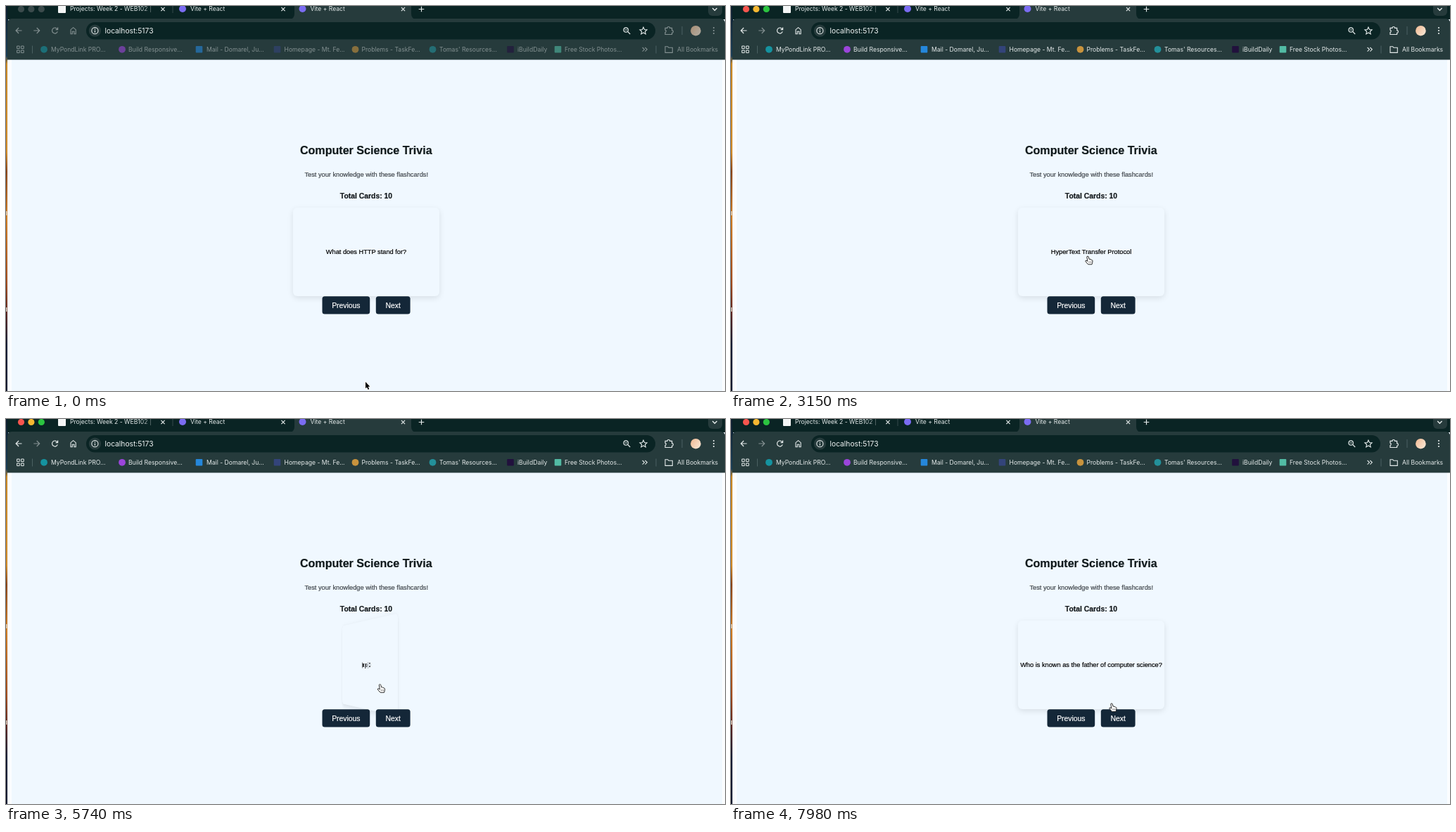
Write an HTML page with a canvas that moves like this. It is 1022 by 548 pixels and loops after 8000 ms.

```html
<!DOCTYPE html>
<html lang="en">
<head>
<meta charset="utf-8">
<title>Computer Science Trivia</title>
<style>
  html, body { margin: 0; width: 100%; height: 100%; overflow: hidden; background: #f0f8ff; }
  canvas { position: absolute; left: 0; top: 0; }
  #card {
    position: absolute; left: 408px; top: 287px; width: 208px; height: 126px;
    border-radius: 6px; background: #f0f8ff; box-shadow: 0 2.8px 9px rgba(0, 0, 0, .1);
    display: flex; align-items: center; justify-content: center;
    font: 9.24px "Liberation Sans", Arial, sans-serif; color: #000; white-space: nowrap;
    -webkit-text-stroke: .2px #000;
  }
</style>
</head>
<body>
<canvas id="back" width="1022" height="548"></canvas>
<div id="card"></div>
<canvas id="front" width="1022" height="548"></canvas>
<script>
const LOOP = 8000, STEP = 70, FLIP = 300, ACTIVE_AT = 1750, HAND_AT = 1960;
const UI = 'Inter, sans-serif';
const PAGE = '"Liberation Sans", Arial, sans-serif';
const BAR = '#263b3c', DARK = '#0a2424', LIGHT = '#e4eaea', DIM = '#839091';

const card = document.getElementById('card');
const back = document.getElementById('back').getContext('2d');
const front = document.getElementById('front').getContext('2d');

// Pointer tip: time, x, y
const pointer = [
  [0, 511, 535], [140, 506, 499], [350, 506, 499], [630, 500, 417],
  [840, 500, 417], [1190, 507, 356.5], [3150, 507, 355.8], [3290, 511, 363],
  [3500, 536, 404], [3710, 546.5, 418.5], [4410, 546.5, 418.5],
  [4620, 543, 413], [4970, 534.5, 392.5], [5250, 531, 377],
  [5740, 531.5, 377.3], [6370, 525, 382], [6580, 531, 396],
  [6930, 545, 421], [7280, 545, 421], [7630, 543, 412], [7980, 541, 404.5]
];

const clicks = [1750, 2240, 3780, 5320, 7000];

const cards = [
  { at: 0, text: 'What does HTTP stand for?' },
  { at: 2580, text: 'HyperText Transfer Protocol', from: 0, to: 360 },
  { at: 4050, text: 'What is the time complexity of binary search?', from: 360, to: 0 },
  { at: 5678, text: 'O(log n)', from: 0, to: 360 },
  { at: 7258, text: 'Who is known as the father of computer science?', from: 360, to: 0 }
];

// Bookmark: icon x, icon colour, text x, label, square icon
const bookmarks = [
  [54, '#1593a0', 64, 'MyPondLink PRO...', false],
  [165, '#9b45db', 174, 'Build Responsive...', false],
  [274.5, '#2587db', 285, 'Mail - Domarel, Ju...', true],
  [385.5, '#33447a', 395.5, 'Homepage - Mt. Fe...', true],
  [496.5, '#c8933d', 505.5, 'Problems - TaskFe...', false],
  [606.5, '#23909a', 616, "Tomas' Resources...", false],
  [717, '#21113d', 727, 'iBuildDaily', true],
  [784.5, '#52bba4', 794, 'Free Stock Photos...', true]
];

function rect(c, x, y, w, h, color, r = 0) {
  c.fillStyle = color;
  c.beginPath();
  c.roundRect(x, y, w, h, r);
  c.fill();
}

function disc(c, x, y, r, color) {
  c.fillStyle = color;
  c.beginPath();
  c.arc(x, y, r, 0, Math.PI * 2);
  c.fill();
}

function ring(c, x, y, r, color, width) {
  c.strokeStyle = color;
  c.lineWidth = width;
  c.beginPath();
  c.arc(x, y, r, 0, Math.PI * 2);
  c.stroke();
}

function stroke(c, d, color, width = 1.2) {
  c.strokeStyle = color;
  c.lineWidth = width;
  c.stroke(new Path2D(d));
}

function label(c, text, x, y, font, color, align = 'left') {
  c.font = font;
  c.fillStyle = color;
  c.textAlign = align;
  c.fillText(text, x, y);
}

// Page text carries slightly heavier strokes than the browser chrome
function pageLabel(c, text, x, y, font, color) {
  label(c, text, x, y, `${font} ${PAGE}`, color, 'center');
  c.strokeStyle = color;
  c.lineWidth = .2;
  c.strokeText(text, x, y);
}

function closeMark(x) {
  stroke(back, `M${x - 2.6} 1.9l5.2 5.2m0-5.2l-5.2 5.2`, LIGHT, 1.2);
}

function drawDesktopEdge() {
  const g = back.createLinearGradient(0, 0, 0, 548);
  [[0, '#0b1c2c'], [.13, '#173b55'], [.15, '#c98722'], [.38, '#d08a26'], [.43, '#8a4418'],
   [.55, '#cf7c22'], [.72, '#a04a1c'], [.8, '#5a2420'], [.88, '#141c34'], [1, '#101a30']]
    .forEach(([at, color]) => g.addColorStop(at, color));
  rect(back, 0, 0, 3, 548, g);
  rect(back, 0, 292, 1.3, 6, '#e6dccb');
  rect(back, 0, 429, 1.3, 6, '#e6dccb');
}

function drawTabs(active) {
  rect(back, 2, 0, 1020, 19, DARK);
  const lights = active ? ['#f7554e', '#f6b731', '#2bc440'] : ['#3b4b4c', '#3b4b4c', '#3b4b4c'];
  lights.forEach((color, i) => disc(back, 21.5 + i * 14.4, 4.5, 4.6, color));

  back.fillStyle = BAR;
  back.fill(new Path2D('M403 19Q410 18 410 11V0H576V11Q576 18 583 19z'));
  rect(back, 74, -1, 11, 11, '#f4f6f6', 1);
  const fade = back.createLinearGradient(190, 0, 211, 0);
  fade.addColorStop(0, LIGHT);
  fade.addColorStop(1, '#4a5c5d');
  label(back, 'Projects: Week 2 - WEB102 |', 91, 7.4, `8.6px ${UI}`, fade);
  rect(back, 236.5, 0, 1, 10, '#34494a');
  [[251, 223], [421.5, 394]].forEach(([iconX, crossX]) => {
    disc(back, iconX, 4, 5, '#7b6cf2');
    label(back, 'Vite + React', iconX + 11, 7.4, `8.6px ${UI}`, LIGHT);
    closeMark(crossX);
  });
  closeMark(564.5);
  stroke(back, 'M586.7 4.5h7.6m-3.8-3.8v7.6', LIGHT);
  rect(back, 998, -7, 20, 21, BAR, 6);
  stroke(back, 'M1004.2 3l3.2 3.2 3.2-3.2', LIGHT, 1.4);
}

function drawToolbar(active) {
  const tint = active ? LIGHT : DIM;
  rect(back, 2, 18, 1020, 58.5, BAR, [6, 6, 0, 0]);
  stroke(back, 'M22.5 35h-8.4m4-4l-4 4 4 4', tint);
  stroke(back, 'M39.3 35h8.4m-4-4l4 4-4 4', DIM);
  stroke(back, 'M73 33a4 4 0 1 0 .3 3.4M73.6 30.6v3h-3', tint);
  stroke(back, 'M92 39.7v-6l3.6-3 3.6 3v6h-2.3v-3.5h-2.6v3.5z', tint, 1.1);

  rect(back, 114, 23, 809, 24.5, DARK, 12.2);
  disc(back, 126.4, 35.2, 8.6, BAR);
  ring(back, 126.4, 35.2, 4.6, LIGHT, 1.1);
  stroke(back, 'M126.4 34.7v3m0-5.2v1.2', LIGHT, 1.1);
  label(back, 'localhost:5173', 140.5, 38.8, `10.25px ${UI}`, '#f1f5f5');
  ring(back, 881.2, 34, 3.2, LIGHT, 1.2);
  stroke(back, 'M883.6 36.4l3.6 3.6M879.6 34h3.2', LIGHT, 1.2);
  stroke(back, 'M906 30.2l1.5 3.3 3.6.4-2.7 2.4.8 3.6-3.2-1.9-3.2 1.9.8-3.6-2.7-2.4 3.6-.4z', LIGHT, 1.1);

  stroke(back, 'M937 31.3h3a1.8 1.8 0 0 1 3.6 0h3v3.4a1.8 1.8 0 0 1 0 3.6v2.2h-9.6v-3a1.8 1.8 0 0 0 0-3.4z', tint, 1.2);
  rect(back, 960.5, 29, 1, 12, '#4b6162');
  back.globalAlpha = active ? 1 : .65;
  const skin = back.createLinearGradient(974, 30, 988, 40);
  skin.addColorStop(0, '#f0bd98');
  skin.addColorStop(1, '#fbe8d6');
  disc(back, 980.4, 35.2, 7.3, skin);
  back.globalAlpha = 1;
  [31, 35, 39].forEach(y => disc(back, 1006, y, 1.1, tint));
}

function drawBookmarks(active) {
  const tint = active ? LIGHT : DIM;
  [[15.6, 57], [21.6, 57], [15.6, 63], [21.6, 63]]
    .forEach(([x, y]) => stroke(back, `M${x} ${y}h3.6v3.6h-3.6z`, tint, 1));
  rect(back, 37, 56.5, 1, 11, '#4b6162');
  for (const [iconX, color, x, text, square] of bookmarks) {
    back.globalAlpha = active ? 1 : .6;
    if (square) rect(back, iconX - 4.8, 57, 9.6, 9.6, color, 1);
    else disc(back, iconX, 61.8, 4.9, color);
    back.globalAlpha = 1;
    label(back, text, x, 64.9, `8.6px ${UI}`, tint);
  }
  stroke(back, 'M904.6 59l2.9 2.8-2.9 2.8m3.8-5.6l2.9 2.8-2.9 2.8', tint, 1.1);
  rect(back, 923.5, 56.5, 1, 11, '#4b6162');
  stroke(back, 'M937 57.7h3.6l1.3 1.5h5.4v7.2h-10.3z', tint, 1.1);
  label(back, 'All Bookmarks', 954, 64.9, `8.6px ${UI}`, tint);
}

function drawPage() {
  rect(back, 2, 76, 1020, 472, '#fbfdff');
  rect(back, 8, 76, 1010, 472, '#f0f8ff');
  pageLabel(back, 'Computer Science Trivia', 511.8, 211, 'bold 16.1px', '#111a1c');
  pageLabel(back, 'Test your knowledge with these flashcards!', 512.2, 243.2, '9.24px', '#41474c');
  pageLabel(back, 'Total Cards: 10', 512, 274.2, 'bold 10.4px', '#14191c');
}

function drawBack(active) {
  drawDesktopEdge();
  drawPage();
  drawTabs(active);
  drawToolbar(active);
  drawBookmarks(active);
}

function drawButton(text, x, w) {
  rect(front, x, 413.2, w, 25.4, '#142738', 3.5);
  pageLabel(front, text, x + w / 2, 429.6, '10.4px', '#fff');
}

function pointerAt(t) {
  const i = pointer.findIndex(p => p[0] > t);
  if (i < 0) return pointer[pointer.length - 1].slice(1);
  const [t0, x0, y0] = pointer[i - 1], [t1, x1, y1] = pointer[i];
  const k = (t - t0) / (t1 - t0);
  return [x0 + (x1 - x0) * k, y0 + (y1 - y0) * k];
}

function drawPointer(t) {
  const [x, y] = pointerAt(t);
  const age = t - clicks.filter(c => c <= t).pop();
  if (age < 140) ring(front, x, y, 22 - 6.5 * Math.min(1, age / STEP), '#111', 1.4);
  front.save();
  front.translate(x, y);
  if (t < HAND_AT) {
    const arrow = new Path2D('M0 0V9.2L2 7.4 3.6 10.9 5.2 10.2 3.7 6.8H6.4z');
    front.strokeStyle = '#fff';
    front.lineWidth = 1.4;
    front.stroke(arrow);
    front.fillStyle = '#000';
    front.fill(arrow);
  } else {
    const hand = 'M-1.2 1Q0-.5 1.2 1L2 4.6Q3 3.8 4 5 5 4.5 5.6 5.8 6.8 5.6 7 7L6.7 9.6 6 12H.6L-3 7.9Q-3.6 6.3-2 6.4L-.2 7.5z';
    front.fillStyle = '#fff';
    front.fill(new Path2D(hand));
    stroke(front, hand, '#151515', .9);
    stroke(front, 'M1.7 7.6v2.4m1.7-2.4v2.4m1.7-2.4v2.4', '#333', .5);
  }
  front.restore();
}

// CSS "ease" curve, solved by bisection
function ease(p) {
  if (p <= 0 || p >= 1) return p <= 0 ? 0 : 1;
  const bez = (a, b, s) => 3 * (1 - s) ** 2 * s * a + 3 * (1 - s) * s * s * b + s ** 3;
  let lo = 0, hi = 1;
  for (let i = 0; i < 24; i++) {
    const mid = (lo + hi) / 2;
    if (bez(.25, .25, mid) < p) lo = mid; else hi = mid;
  }
  return bez(.1, 1, lo);
}

function drawCard(t) {
  const { at, text, from = 0, to = 0 } = cards.filter(c => c.at <= t).pop();
  const angle = from + (to - from) * ease((t - at) / FLIP);
  if (card.textContent !== text) card.textContent = text;
  card.style.transform = angle % 360 ? `perspective(693px) rotateY(${angle}deg)` : 'none';
}

let shown = null;
function frame() {
  const t = Math.floor(performance.now() % LOOP / STEP) * STEP;
  const active = t >= ACTIVE_AT;
  if (active !== shown) {
    drawBack(active);
    shown = active;
  }
  drawCard(t);
  front.clearRect(0, 0, 1022, 548);
  drawButton('Previous', 449.5, 67.7);
  drawButton('Next', 525.8, 48.8);
  drawPointer(t);
  requestAnimationFrame(frame);
}
frame();
</script>
</body>
</html>
```
